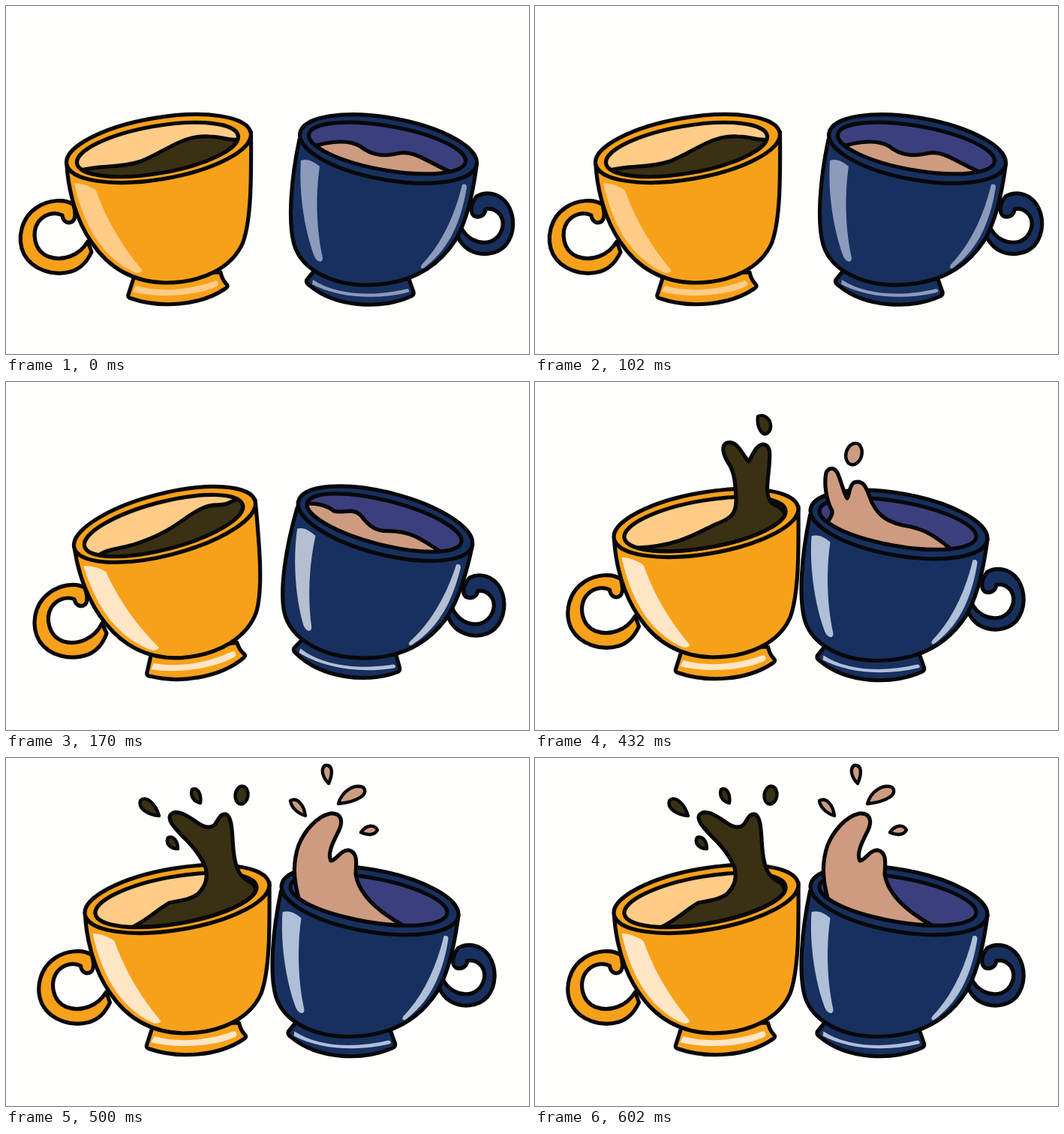
These frames come from a looping animation (697x464 px, 670 ms). An HTML page:

```html
<!DOCTYPE html>
<html lang="en">
<head>
<meta charset="utf-8">
<title>Clinking cups</title>
<style>
html, body { margin: 0; width: 100%; height: 100%; overflow: hidden; background: #fefefc; }
svg { display: block; width: 100%; height: 100%; stroke: #08080a; stroke-width: 5.2; stroke-linejoin: round; stroke-linecap: round; }
.thin { stroke-width: 4.4; }
.shine { stroke: none; }
.line { fill: none; }
#left { fill: #f7a11a; }
#right { fill: #17305f; }
.coffee { fill: #3a3014; }
.milk { fill: #cd9b80; }
#left .shine { fill: var(--warm); }
#right .shine { fill: var(--cool); }
</style>
</head>
<body>
<svg viewBox="0 0 697 464">
  <defs>
    <ellipse id="mouthL" cx="202" cy="191.5" rx="109" ry="31.5" transform="rotate(-9.8 202 191.5)"/>
    <ellipse id="mouthR" cx="508" cy="189.5" rx="106" ry="29.5" transform="rotate(10 508 189.5)"/>
    <clipPath id="clipL"><use href="#mouthL"/></clipPath>
    <clipPath id="clipR"><use href="#mouthR"/></clipPath>
  </defs>

  <g id="left">
    <path d="M90 265C78 256 56 259 42 268C20 282 14 310 24 331C35 351 62 361 87 354C100 350 108 341 114 328L109 314C98 333 75 341 56 334C37 326 34 302 43 288C51 277 65 274 75 279C76 288 83 291 89 287C93 283 93 276 90 265Z"/>
    <path d="M171 360L163 385Q162 389 167 390C205 403 258 400 292 377Q297 374 294 371Q288 365 286 355Z"/>
    <path class="shine" d="M173 373C205 382 245 379 280 366Q286 370 281 374C250 388 200 389 169 381Z"/>
    <path d="M81 212C83 245 93 285 114 315C136 348 168 368 212 369C262 369 301 349 315.500 316C327 285 327 230 326.500 168Z"/>
    <path class="shine" d="M91 236C100 236 112 240 120 246C134 285 153 318 182 353C178 358 172 356 165 352C125 330 103 290 91 236Z"/>
    <ellipse cx="203.500" cy="190" rx="124.500" ry="41" transform="rotate(-9.6 203.500 190)"/>
    <use href="#mouthL" fill="#ffcc88" stroke="none"/>
    <g class="coffee" clip-path="url(#clipL)">
      <path data-on="0" d="M100 219C125 212 150 217 180 207C215 193 235 172 270 174C288 174 295 180 312 178L320 240H100Z"/>
      <path data-on="1" d="M108 226C125 214 145 218 165 212C215 200 230 182 252 174C270 166 280 173 290 169L312 161L320 240H108Z"/>
    </g>
    <use href="#mouthL" class="line"/>
  </g>

  <g id="right">
    <path d="M627 254C641 246 658 250 668 264C679 281 678 304 666 319C654 332 633 334 617 325C609 320 604 313 601 305L606 294C613 310 630 319 646 314C661 308 666 290 659 279C653 271 646 269 639 271C639 279 631 283 624 280C618 275 619 265 627 254Z"/>
    <path d="M410 354L401 365Q399 369 405 373C440 402 500 405 540 387Q544 385 543 381L537 364Z"/>
    <path class="shine" d="M409 365C440 386 490 388 535 377Q540 380 535 382C490 393 440 388 408 371Z"/>
    <path d="M391 178C379 235 376 290 384 318C395 355 440 372 480 372C540 372 577 346 599 312C615 285 623 245 627.500 210Z"/>
    <path class="shine" d="M393 206C402 203 411 208 418 214C412 255 414 300 422 336C422 343 415 342 411 334C398 300 390 250 393 206Z"/>
    <path class="shine" d="M608 238Q614 236 614 242C606 290 590 325 556 350Q551 350 554 345C580 318 598 280 608 238Z"/>
    <ellipse cx="509.500" cy="190.500" rx="119.500" ry="41.300" transform="rotate(10.1 509.500 190.500)"/>
    <use href="#mouthR" fill="#3c3f7e" stroke="none"/>
    <g class="milk" clip-path="url(#clipR)">
      <path data-on="0" d="M400 190C430 180 455 177 472 187C488 200 505 201 525 196C545 193 560 207 592 221L590 250H400Z"/>
      <path data-on="1" d="M400 172C418 170 430 172 440 179C452 182 464 172 476 182C490 198 500 202 515 200C545 198 560 208 585 222L580 250H400Z"/>
    </g>
    <use href="#mouthR" class="line"/>
  </g>

  <!-- Splashes: the closing arc follows the lower lip of the cup -->
  <g data-on="2">
    <g class="coffee">
      <path d="M136 221C190 219 215 202 240 190C262 182 269 175 268 155C267 135 266 122 259 110C251 98 247 85 256 81C271 78 276 98 285 106C290 98 294 84 304 83C315 84 313 97 312 112C310 135 306 152 316 162C324 166 334 170 332 179L329.300 182.600A109 31.500 -9.800 0 1 136 221Z"/>
      <path class="thin" d="M297 46C304 42 313 48 314 57C315 66 308 72 303 68C297 62 296 54 297 46Z"/>
    </g>
    <g class="milk">
      <path d="M390 187C394 180 399 174 394 168C388 155 385 135 388 121C392 113 399 114 403 121C409 134 411 148 416 155C420 149 418 139 425 134C437 130 441 139 446 153C454 177 469 186 490 191C520 195 535 207 554 222.500A106 29.500 10 0 1 390 187Z"/>
      <ellipse class="thin" cx="425" cy="96" rx="10.500" ry="14.500" transform="rotate(15 425 96)"/>
    </g>
  </g>

  <g data-on="3">
    <g class="coffee">
      <path d="M169 225C190 215 200 203 218 193C232 190 245 189 255 182C267 170 269 160 266 146C260 132 248 116 235 104C224 92 215 83 219 76C226 67 240 76 252 84C262 92 272 95 279 88C284 79 287 74 293 75C302 79 301 100 303 122C305 142 309 156 321 163C330 167 334 172 332 179L329.300 182.600A109 31.500 -9.800 0 1 169 225Z"/>
      <path class="thin" d="M204 77C190 76 176 68 179 57C186 49 199 60 204 77ZM259 60C250 58 245 50 248 42C255 38 261 48 259 60ZM229 121C219 121 212 114 216 106C224 103 229 112 229 121Z"/>
      <ellipse class="thin" cx="314" cy="49.500" rx="8.500" ry="12" transform="rotate(8 314 49.500)"/>
    </g>
    <g class="milk">
      <path d="M390 187C383 160 382 140 390 116C398 97 414 78 432 74C447 73 450 84 443 98C436 112 428 127 433 137C441 136 446 122 457 123C469 126 467 140 466 155C470 180 493 203 529 223A106 29.500 10 0 1 390 187Z"/>
      <path class="thin" d="M399 77C389 74 380 66 379 57C388 52 397 62 399 77ZM430 34C422 26 419 15 425 10C434 8 437 18 430 34ZM443 61C447 46 462 34 476 39C484 48 470 58 443 61ZM473 99C480 89 491 88 495 96C491 104 480 103 473 99Z"/>
    </g>
  </g>
</svg>
<script>
const clink = { left: 'translate(24.5 -2)', right: 'translate(-24.5 -.5)', warm: '#ffe6c6', cool: '#b0bfd8' };
const poses = [
  { until: 170, left: '', right: '', warm: '#ffcc88', cool: '#8c9abb' },
  { until: 330, left: 'translate(14 0) rotate(-4.9 200 260)', right: 'translate(-10 -2) rotate(4.3 510 270)', warm: '#ffe6c6', cool: '#b4bfd2' },
  { until: 500, ...clink },
  { until: 670, ...clink }
];
const svg = document.querySelector('svg');
const parts = document.querySelectorAll('[data-on]');
let shown = -1;

function show(i) {
  const pose = poses[i];
  for (const side of ['left', 'right'])
    document.getElementById(side).setAttribute('transform', pose[side]);
  svg.style.setProperty('--warm', pose.warm);
  svg.style.setProperty('--cool', pose.cool);
  for (const part of parts) part.style.display = +part.dataset.on === i ? '' : 'none';
  shown = i;
}

const start = performance.now();
function tick() {
  const t = (performance.now() - start) % 670;
  const i = poses.findIndex(p => t < p.until);
  if (i !== shown) show(i);
  requestAnimationFrame(tick);
}
tick();
</script>
</body>
</html>
```
